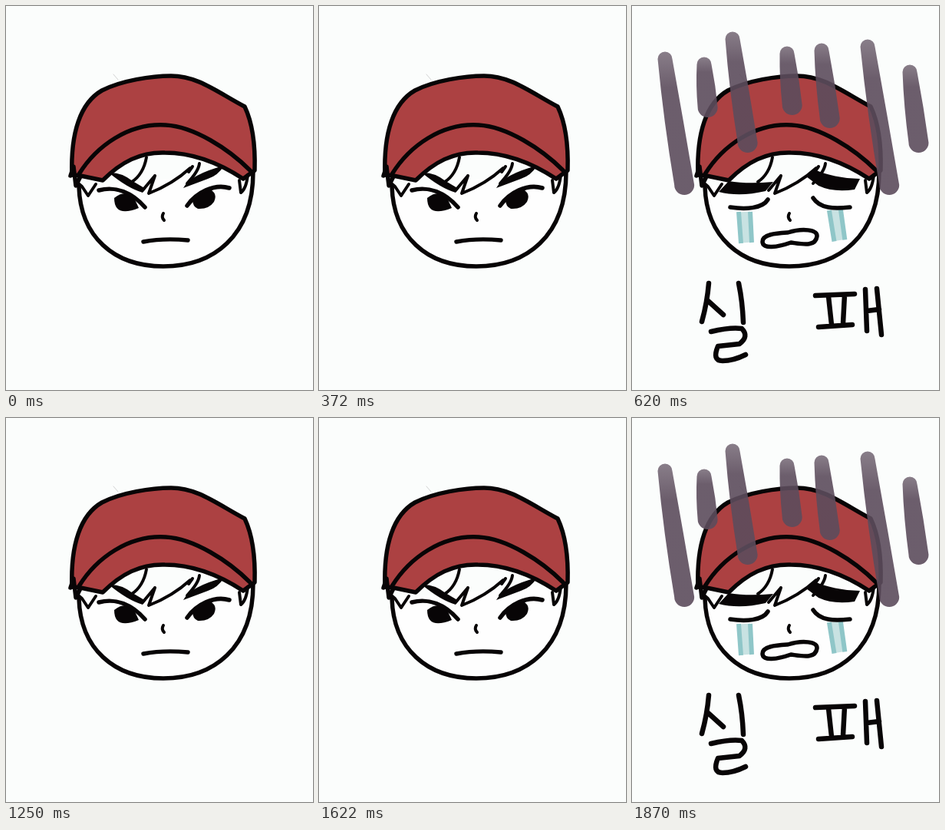
Write an HTML page that moves like this. It is 400 px wide and 500 px high and loops after 2370 ms.

```html
<!DOCTYPE html>
<html lang="ko">
<head>
<meta charset="utf-8">
<style>
  html, body { margin: 0; height: 100%; overflow: hidden; background: #fbfdfc; }
  svg { display: block; width: 100vw; height: 100vh; }
  .line { fill: none; stroke: #080506; stroke-width: 5.5; stroke-linecap: round; stroke-linejoin: round; }
  .thin { stroke-width: 4; }
  .bold { stroke-width: 6.5; }
  .ink { fill: #080506; }
  .skin { fill: #fefefe; }
  .cap { fill: #ac4142; }
</style>
</head>
<body>
<svg viewBox="0 0 400 500">
  <defs>
    <linearGradient id="shade" x1="0" y1="0" x2="0" y2="1">
      <stop offset="0" stop-color="#5c4c5c" stop-opacity=".72"/>
      <stop offset=".25" stop-color="#5c4c5c" stop-opacity=".9"/>
      <stop offset="1" stop-color="#5c4c5c" stop-opacity=".9"/>
    </linearGradient>
    <g id="tear" fill="none">
      <path d="M8 -1L11 39" stroke="#c8e2e2" stroke-width="14"/>
      <path d="M0 -1L3 40M15 -1L17 39" stroke="#8fc6c8" stroke-width="6"/>
    </g>
  </defs>

  <g id="head" class="line">
    <path class="skin" d="M95 235C97 300 140 339 205 339S322 300 322 216"/>
    <path class="cap" d="M97 221L86 220C84 165 97 126 125 110C150 97 190 91 215 91C250 91 275 112 311 131C321 152 325 180 324 214L309 225C280 206 245 191 207 191C175 190 150 203 126 227Z"/>
    <path d="M95 219C118 182 160 152 208 155C245 157 290 186 318 214"/>
    <path d="M84 221L88 209L91 234L97 222"/>
    <g class="thin">
      <path d="M92 229L99 235L107 247L117 232"/>
      <path d="M183 197Q179 219 164 229M194 221L178 240M194 221L186 244Q217 232 240 211"/>
      <path d="M252 205Q251 215 236 231M243 209L238 216"/>
      <path d="M304 227L306 243Q313 238 315 220"/>
      <path d="M205 270Q202 275 206 279"/>
    </g>
    <path d="M140 89L146 96" stroke="#d3d3d3" stroke-width="1"/>
  </g>

  <g id="angry">
    <path class="ink" d="M134 217Q150 216 165 228L182 238L178 243Q158 237 134 217ZM231 237Q241 219 284 208Q276 221 263 225Z"/>
    <path class="ink" d="M141 250Q154 239 166 248L173 263Q141 276 141 250ZM243 252Q251 238 266 239Q276 244 271 255Q264 265 250 264Q243 261 243 252Z"/>
    <g class="line">
      <path d="M121 240C143 234 164 243 181 262M236 260C248 243 271 231 291 237"/>
      <path d="M179 307Q205 302 237 305"/>
    </g>
  </g>

  <g id="sad">
    <path class="ink" d="M113 242L126 228Q150 232 184 229L174 241Q140 249 113 242ZM227 222L238 213Q262 224 297 225L290 239Q262 243 243 234Z"/>
    <use href="#tear" transform="translate(139 269)"/>
    <use href="#tear" transform="translate(257 267) rotate(-5)"/>
    <g class="line">
      <path d="M128 262C147 265 170 264 177 252M236 250C245 264 263 264 284 262"/>
      <path d="M170 307C170 297 188 296 203 295C222 289 242 291 241 300C239 314 222 310 207 308C190 314 170 317 170 307Z"/>
      <g class="bold" role="img" aria-label="실 패">
        <path d="M100 361Q98 386 91 411M98 383L119 402M139 361Q144 385 145 412"/>
        <path d="M103 424Q128 418 143 420Q153 430 140 440L112 443Q104 462 118 462Q132 462 148 454"/>
        <path d="M239 377L290 375M256 378L260 415M277 376L275 413M243 418L287 415"/>
        <path d="M304 369L306 423M319 368L325 428M306 397L322 395"/>
      </g>
    </g>
    <path id="gloom" fill="url(#shade)"/>
  </g>
</svg>
<script>
const angry = document.getElementById('angry');
const sad = document.getElementById('sad');
const gloom = document.getElementById('gloom');

// A tapered bar with round ends; longer bars lean further right.
function addBar(x, top, length) {
  const lean = 0.19 * length - 6, r0 = 9.5, r1 = 13;
  const endX = x + lean, bottom = top + length;
  const midX = x + lean * 0.45, midY = top + length / 2;
  const bar = gloom.cloneNode();
  bar.removeAttribute('id');
  bar.setAttribute('d', `M${x - r0} ${top}
    A${r0} ${r0} 0 0 1 ${x + r0} ${top}
    Q${midX + r1} ${midY} ${endX + r1} ${bottom}
    A${r1} ${r1} 0 0 1 ${endX - r1} ${bottom}
    Q${midX - r1} ${midY} ${x - r0} ${top}Z`);
  sad.append(bar);
}

addBar(43, 69, 164);
addBar(94, 76, 56);
addBar(131, 43, 135);
addBar(202, 62, 67);
addBar(247, 58, 88);
addBar(307, 53, 180);
addBar(362, 86, 92);
gloom.remove();

function draw() {
  const t = performance.now() % 2370;
  const isAngry = t % 1250 < 620;
  angry.style.display = isAngry ? '' : 'none';
  sad.style.display = isAngry ? 'none' : '';
  requestAnimationFrame(draw);
}
draw();
</script>
</body>
</html>
```
